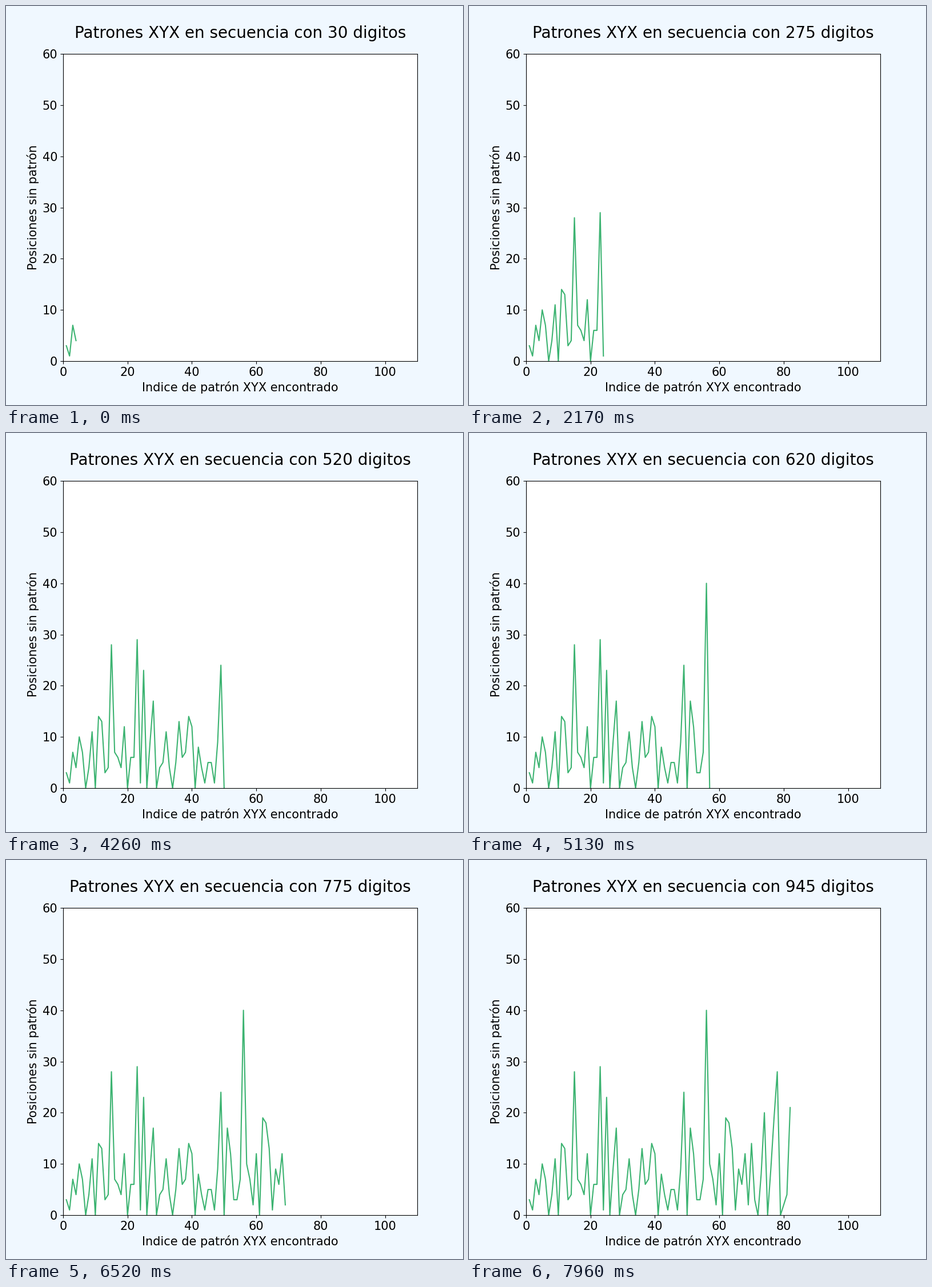
Recreate the animation shown at these times as a matplotlib script. Size 800 px wide and 700 px high, loop 8000 ms.

```python
import matplotlib.pyplot as plt
from matplotlib.animation import FuncAnimation

LOOP_MS = 8000
STEPS = 184
START, STRIDE = 30, 5
PRECISION = 1000


def euler_scaled(places):
    """Return e * 10**places as an integer, using the factorial series."""
    guard = 10 ** 20
    term = 10 ** places * guard
    total, k = 0, 0
    while term:
        total += term
        k += 1
        term //= k
    return total // guard


E_SCALED = euler_scaled(PRECISION)


def euler_digits(count):
    """First `count` significant digits of e, the last one rounded."""
    cut = 10 ** (PRECISION + 1 - count)
    return str((E_SCALED + cut // 2) // cut)


def pattern_gaps(digits):
    """Number of digits skipped before each non-overlapping XYX."""
    gaps, pos, gap = [], 0, 0
    while pos + 2 < len(digits):
        if digits[pos] == digits[pos + 2]:
            gaps.append(gap)
            gap = 0
            pos += 3
        else:
            gap += 1
            pos += 1
    return gaps


fig, ax = plt.subplots(figsize=(8, 7), dpi=100, facecolor="aliceblue")
fig.subplots_adjust(left=0.125, right=0.9, bottom=0.11, top=0.88)
plt.rcParams["font.family"] = "DejaVu Sans"

ax.set_xlim(0, 110)
ax.set_ylim(0, 60)
ax.tick_params(labelsize=15)
ax.set_xlabel("Indice de patrón XYX encontrado", fontsize=15)
ax.set_ylabel("Posiciones sin patrón", fontsize=15)
title = ax.set_title("", fontsize=20, pad=20)
line, = ax.plot([], [], color="mediumseagreen", linewidth=1.5)


def update(step):
    count = START + STRIDE * step
    gaps = pattern_gaps(euler_digits(count))
    line.set_data(range(1, len(gaps) + 1), gaps)
    title.set_text(f"Patrones XYX en secuencia con {count} digitos")
    return line, title


anim = FuncAnimation(fig, update, frames=STEPS, interval=LOOP_MS / STEPS,
                     init_func=lambda: update(0), repeat=True)
plt.show()
```
